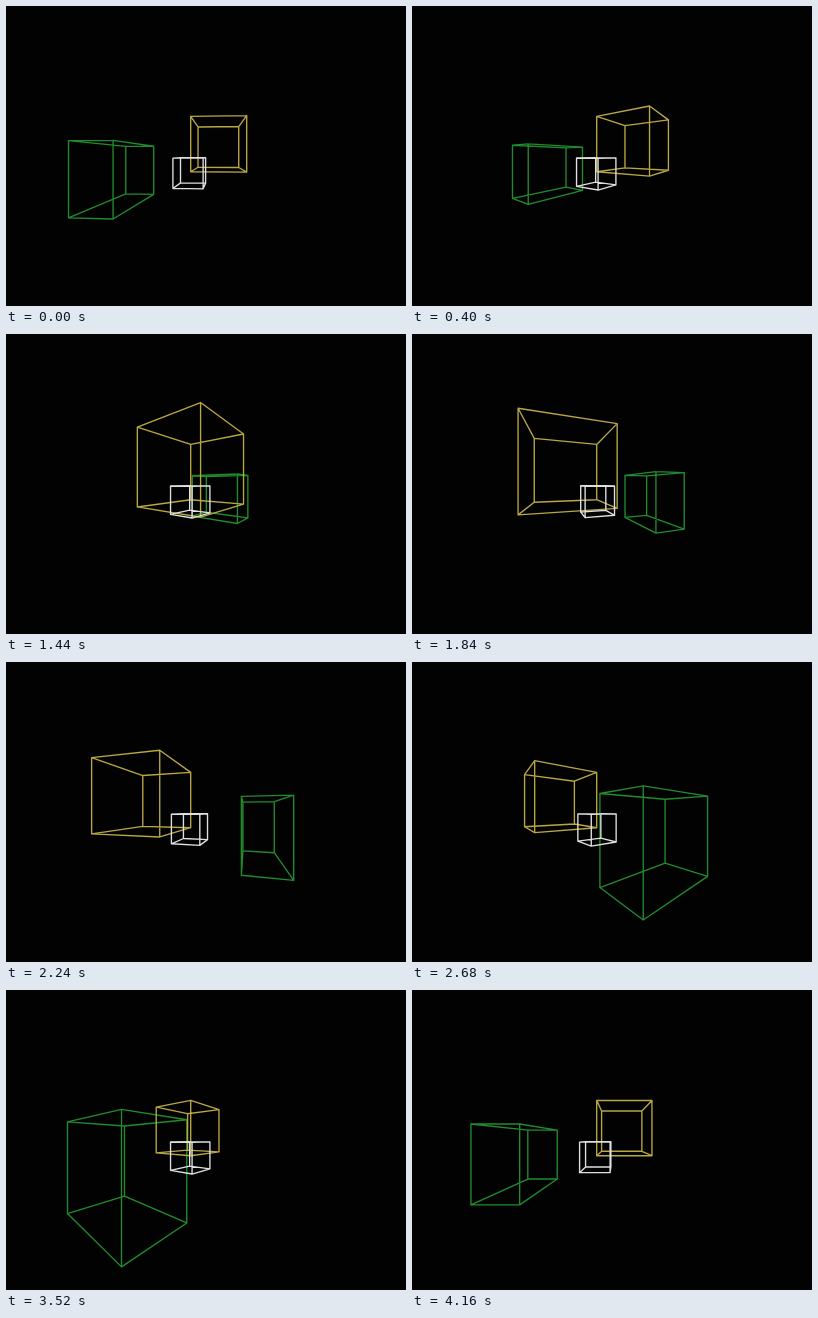
These frames come from a looping animation (400x300 px, 4200 ms). An HTML page with a canvas:

```html
<!DOCTYPE html>
<html>
<head>
<meta charset="utf-8">
<title>Rotating boxes</title>
<style>
html, body { margin: 0; width: 100%; height: 100%; overflow: hidden; background: #020202; }
canvas { display: block; }
</style>
</head>
<body>
<canvas id="stage" width="400" height="300"></canvas>
<script>
const ctx = document.getElementById('stage').getContext('2d');
const LOOP = 4200, STEP = 40, STEPS = 104;
const FOCAL = 148.5, DEPTH = 2.685;             // camera
const CX = 203.4, CY = 149.4;                   // vanishing point
const PIVOT_X = -0.338, PIVOT_Y = 0.295;        // turning axis seen from the camera
const START = 0.056;                            // first angle

// Each box: colour and [min, max] along x, y and z around the axis
const boxes = [
  ['#218c2e', [-1.539, -0.909], [-0.495, 0.555], [-0.752, 0.508]],
  ['#b8a745', [0, 1], [-1, 0], [0, 1]],
  ['#e0e0e0', [-0.25, 0.25], [-0.25, 0.25], [-0.25, 0.25]]
];

function project(x, y, z, angle) {
  const c = Math.cos(angle), s = Math.sin(angle);
  const scale = FOCAL / (DEPTH + z * c - x * s);
  return [
    CX + (PIVOT_X + x * c + z * s) * scale,
    CY + (PIVOT_Y + y) * scale
  ];
}

function drawBox([color, xs, ys, zs], angle) {
  const corners = [];
  for (let i = 0; i < 8; i++) {
    corners.push(project(xs[i & 1], ys[i >> 1 & 1], zs[i >> 2], angle));
  }
  ctx.strokeStyle = color;
  ctx.beginPath();
  // Corners that differ in one bit share an edge
  for (let i = 0; i < 8; i++) {
    for (const bit of [1, 2, 4]) {
      if (i & bit) continue;
      ctx.moveTo(...corners[i]);
      ctx.lineTo(...corners[i | bit]);
    }
  }
  ctx.stroke();
}

function draw(time) {
  // The first pose is held for two steps
  const step = Math.max(0, Math.floor(time % LOOP / STEP + 1e-6) - 1);
  const angle = START + step * 2 * Math.PI / STEPS;
  ctx.fillStyle = '#020202';
  ctx.fillRect(0, 0, 400, 300);
  ctx.lineWidth = 1.35;
  ctx.lineCap = 'round';
  for (const box of boxes) drawBox(box, angle);
}

let start;
function tick(now) {
  start ??= now;
  draw(now - start);
  requestAnimationFrame(tick);
}
draw(0);
requestAnimationFrame(tick);
</script>
</body>
</html>
```
